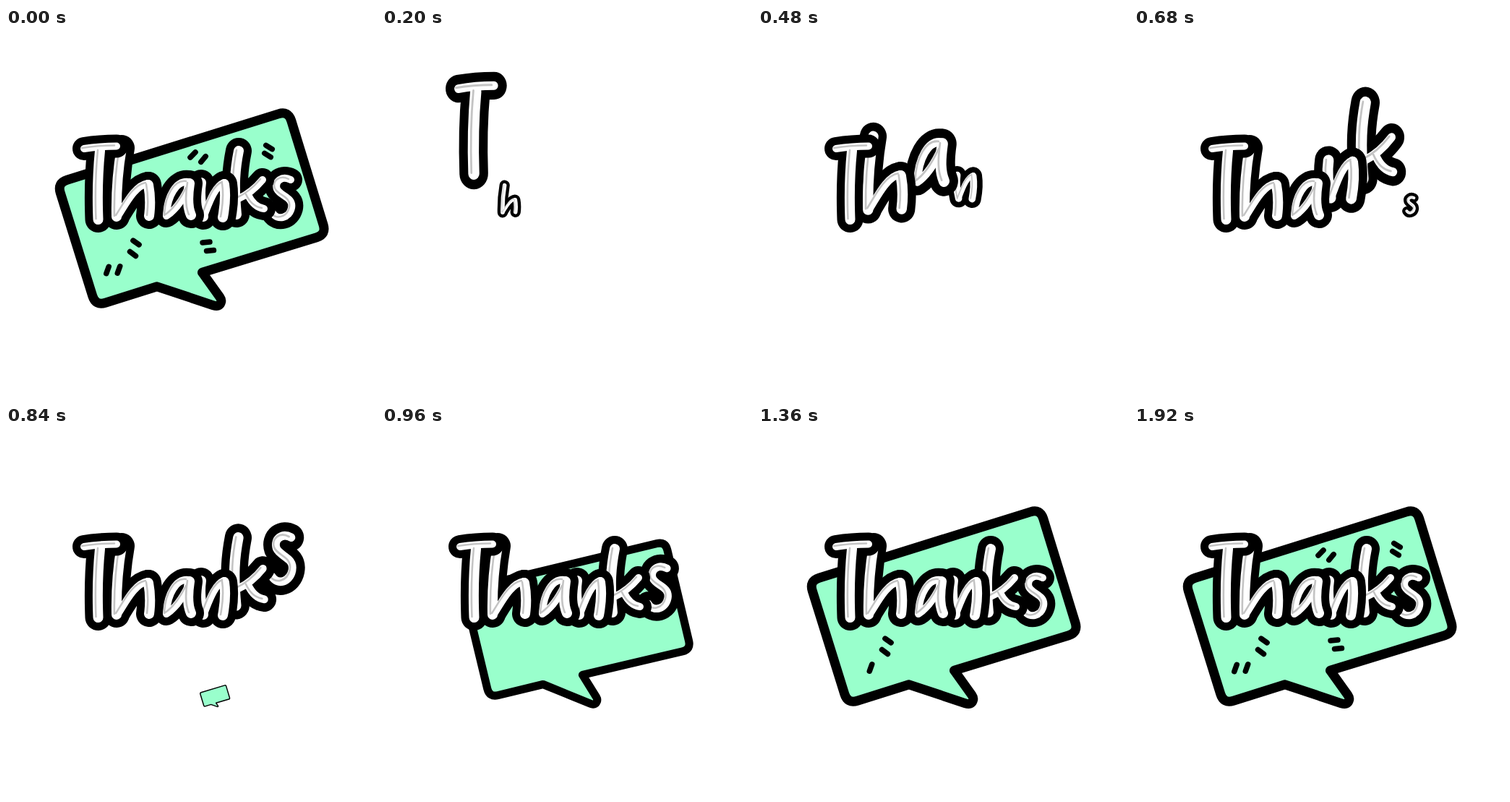
Animation, 512 px wide and 512 px high, one loop 2.56 s. Source, as an HTML page:

```html
<!DOCTYPE html>
<html lang="en">
<head>
<meta charset="utf-8">
<title>Thanks</title>
<style>
  html, body { margin: 0; height: 100%; overflow: hidden; background: #fff; }
  svg { display: block; width: 100%; height: 100%; }
  path { fill: none; stroke: #000; stroke-linecap: round; stroke-linejoin: round; }
  #bubble path { fill: #9fc; stroke-width: 13; }
  #dashes path { stroke-width: 7.5; }
</style>
</head>
<body>
<svg viewBox="0 0 512 512" role="img" aria-label="Thanks">
  <g id="bubble">
    <path d="M84.5 210.2 L377 118.9 Q390.5 114.5 394.7 128 L439 272
      Q443.3 285.6 430 289.7 L271.5 338.3 L296 372.5 Q298.8 376.5 297.3 380
      Q295 386.5 287 383.8 L209 357.8 L137.5 380.2 Q124 384.4 119.8 371
      L75.2 228 Q71 214.5 84.5 210.2Z"/>
  </g>
  <g id="dashes"></g>
  <g id="letters"></g>
</svg>
<script>
const LOOP = 2560, STEP = 40;
const THICK = 14, THIN = 10, BORDER = 22;
const $ = id => document.getElementById(id);

function addPath(parent, d, style = '', transform = '') {
  const el = document.createElementNS('http://www.w3.org/2000/svg', 'path');
  el.setAttribute('d', d);
  el.setAttribute('style', style);
  el.setAttribute('transform', transform);
  return parent.appendChild(el);
}

// Each letter: pivot on its base, thick strokes and thin strokes.
const letters = [
  { x: 132, y: 283, jump: 60,
    thick: 'M130 170 Q125.5 215 127.5 265',
    thin: 'M108 167 Q130 163.5 153 163.5' },
  { x: 176, y: 279,
    thick: 'M160 166 Q152 212 153 261 M197 217 Q201 238 198 260',
    thin: 'M155 260 C165 245 178 218 196 215' },
  { x: 239, y: 277,
    thick: 'M254 215 C251 235 251 248 256 259',
    thin: 'M252 213 C236 211 223 232 222 260 Q238 250 252 222' },
  { x: 288, y: 280,
    thick: 'M270 214 Q267 235 273 261 M302 216 Q305 236 300 262',
    thin: 'M273 262 C280 245 288 219 302 214' },
  { x: 340, y: 275,
    thick: 'M322 170 C317 195 315 217 319 258',
    thin: 'M322 236 Q340 228 355 210 M335 231 Q343 248 357 250' },
  { x: 383, y: 279, thick: '',
    thin: 'M394 210 C382 204 371 212 375 223 C380 233 398 234 395 249 C392 263 376 267 369 256' }
];

// Later letters sit underneath the earlier ones.
letters.forEach((letter, i) => {
  letter.start = 40 + i * 120;
  letter.el = document.createElementNS('http://www.w3.org/2000/svg', 'g');
  $('letters').prepend(letter.el);
  const layer = (color, width, shift = '') => {
    addPath(letter.el, letter.thick, `stroke:${color};stroke-width:${width(THICK)}`, shift);
    addPath(letter.el, letter.thin, `stroke:${color};stroke-width:${width(THIN)}`, shift);
  };
  layer('#000', w => w + BORDER);
  layer('#fff', w => w);
  layer('#c4c4c4', () => 2.5, 'translate(-3 -1)');
});

// Dashes in order of appearance: centre and angle.
const dashes = [
  [180, 297, 35], [175.5, 312.5, 37], [156, 334.5, 110],
  [277, 296.5, -5], [282.5, 308, -5], [364, 165, 32], [362, 176, 32],
  [258.5, 175.5, 135], [273, 181.5, 130], [140.5, 335, 110]
].map(([x, y, angle]) =>
  addPath($('dashes'), 'M-5 0H5', '', `translate(${x} ${y}) rotate(${angle})`));

function show(el, on, transform) {
  el.style.display = on ? '' : 'none';
  if (transform) el.setAttribute('transform', transform);
}

const clamp = v => Math.min(1, Math.max(0, v));

// A letter shoots up past its size while it hops, then settles.
function drawLetter({ el, x, y, start, jump = 46 }, time) {
  const t = time - start;
  const sy = t < 160 ? 1.2 * clamp(t / 160) ** .8 : 1 + .2 * clamp((400 - t) / 240);
  const sx = Math.min(sy, (1 + sy) / 2);
  const lift = jump * Math.sin(Math.PI * clamp(t / 340));
  show(el, sy > 0,
    `translate(${x} ${y - lift}) scale(${sx} ${sy}) translate(${-x} ${-y})`);
}

// The bubble grows out of its tail, overshoots and turns back.
function drawBubble(time) {
  const rise = clamp((time - 822) / 178);
  const over = clamp((1320 - time) / 320) ** 2;
  const scale = rise < 1 ? 1.106 * rise : 1 + .106 * over;
  const turn = 4.9 * rise * over;
  show($('bubble'), scale > 0,
    `translate(293 389) rotate(${turn}) scale(${scale}) translate(-293 -389)`);
}

function draw() {
  const t = Math.floor(performance.now() % LOOP / STEP) * STEP;
  const time = t || LOOP; // the loop opens on the finished picture
  letters.forEach(letter => drawLetter(letter, time));
  drawBubble(time);
  dashes.forEach((el, i) => show(el, time >= 1200 + i * 80));
  requestAnimationFrame(draw);
}
draw();
</script>
</body>
</html>
```
